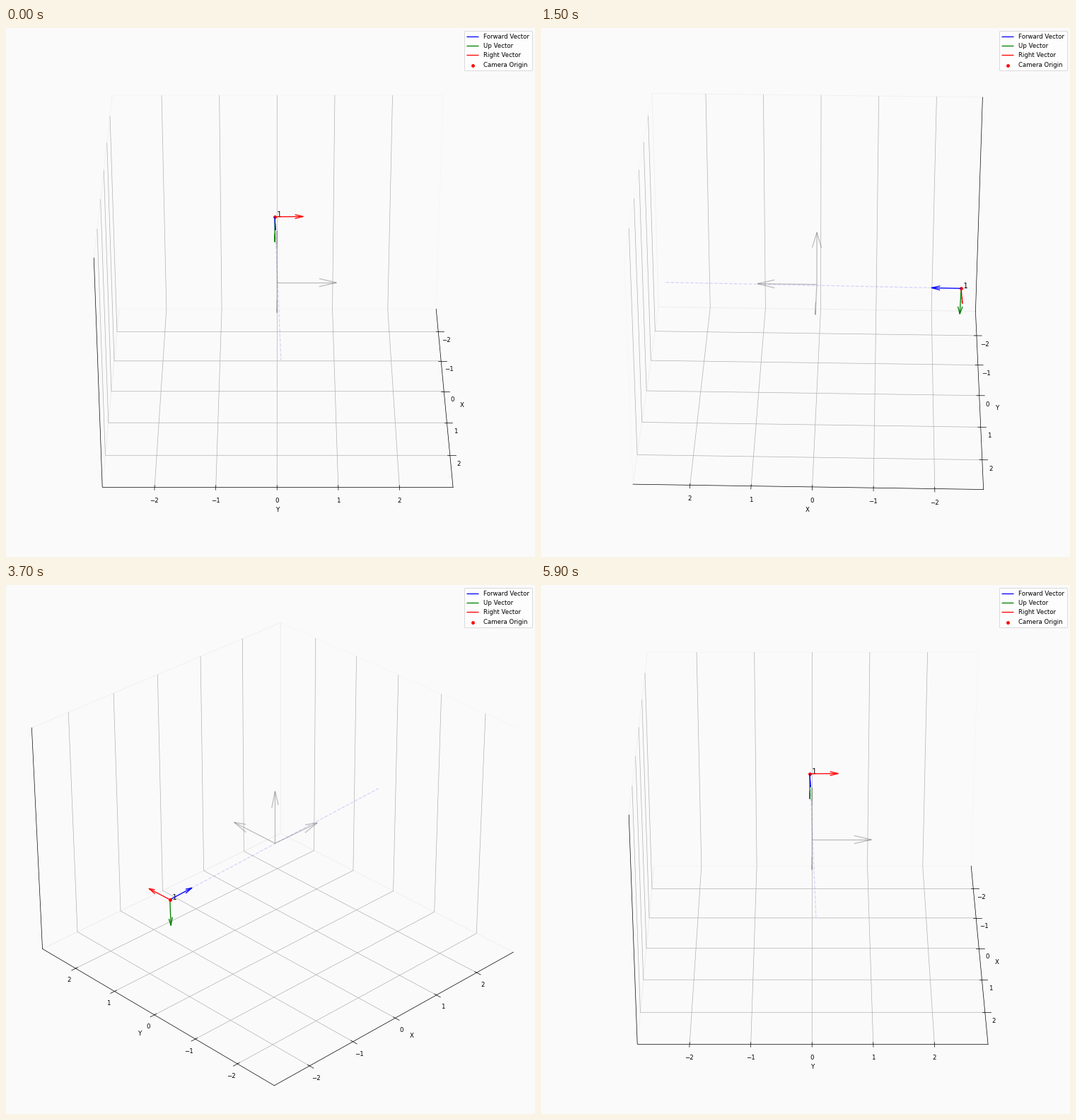
Animation of 748 by 748 pixels, one loop 6000 ms. Source, as a matplotlib script:

```python
import numpy as np
import matplotlib.pyplot as plt
from matplotlib.animation import FuncAnimation

FRAMES = 60
STAGE = 748
INCHES = 12
BACKGROUND = "#fafafa"

# Camera pose: unit forward, right and down directions
camera = np.array([-2.43, -0.04, -0.063])
forward = np.array([1, 0.0208, 0.0206])
forward /= np.linalg.norm(forward)
right = np.array([-forward[1], forward[0], 0])
right /= np.linalg.norm(right)
down = -np.cross(forward, right)

plt.rcParams["font.family"] = "DejaVu Sans"
fig = plt.figure(figsize=(INCHES, INCHES), dpi=STAGE / INCHES,
                 facecolor=BACKGROUND)
ax = fig.add_axes([0, 0, 1, 1], projection="3d", facecolor=BACKGROUND)


def draw_arrow(start, direction, length=1, **style):
    ax.quiver(*start, *direction, length=length, arrow_length_ratio=0.3,
              **style)


def draw_world_axes():
    for direction in np.eye(3):
        draw_arrow((0, 0, 0), direction, color="gray", alpha=0.5)


def draw_camera():
    vectors = [("Forward", forward, "blue"),
               ("Up", down, "green"),
               ("Right", right, "red")]
    for name, direction, color in vectors:
        draw_arrow(camera, direction, 0.5, color=color,
                   label=f"{name} Vector")
    ray = np.array([camera, camera + 5 * forward])
    ax.plot(*ray.T, "--", color="blue", alpha=0.15)
    ax.scatter(*camera, color="red", s=20, label="Camera Origin")
    ax.text(*camera, " 1", size=12)


def style_box():
    half = 2.75 * 25 / 24
    ax.set_xticks(range(-2, 3))
    ax.set_yticks(range(-2, 3))
    ax.set_zticks([])
    ax.set_xlim(0.07 - half, 0.07 + half)
    ax.set_ylim(0.01 - half, 0.01 + half)
    ax.set_zlim(-0.0125 - 0.75 * half, -0.0125 + 0.75 * half)
    ax.set_xlabel("X")
    ax.set_ylabel("Y")
    for axis in (ax.xaxis, ax.yaxis, ax.zaxis):
        axis.pane.fill = False


def update(frame):
    # The tiny offset settles which side wall shows when facing straight on
    azim = frame * 360 / (FRAMES - 1) % 360 + 1e-6
    ax.view_init(elev=30, azim=azim)
    return []


draw_world_axes()
draw_camera()
style_box()
fig.legend(loc="upper right")

anim = FuncAnimation(fig, update, frames=FRAMES, interval=100,
                     init_func=lambda: update(0), repeat=True,
                     repeat_delay=0)
plt.show()
```
